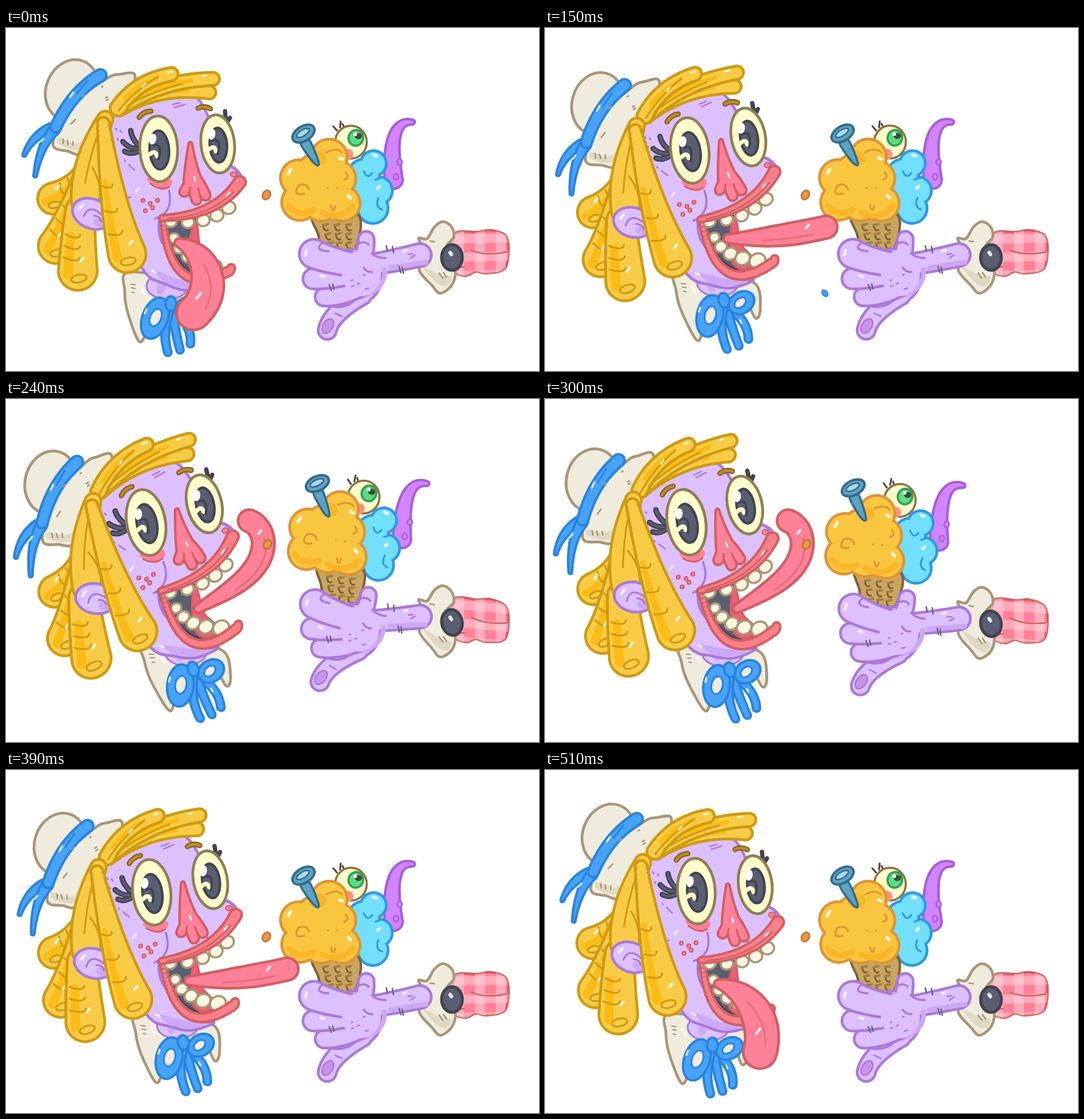
Animation, 876 px wide and 565 px high, one loop 0.54 s. Source, as an HTML page with a canvas:

```html
<!DOCTYPE html>
<html lang="en">
<head>
<meta charset="utf-8">
<title>Ice cream lick</title>
<style>
html, body { margin: 0; width: 100%; height: 100%; overflow: hidden; background: #fff; }
canvas { display: block; }
</style>
</head>
<body>
<canvas id="stage" width="876" height="565"></canvas>
<script>
const ctx = document.getElementById('stage').getContext('2d');
const LOOP = 540, STEP = 30;
const C = {
  cream: '#efecdd', creamDark: '#dfd9c4', creamLine: '#a89678',
  blue: '#47a3f7', blueLine: '#2a84dc', hair: '#f8cb47', hairDark: '#f9bb15', hairLine: '#cd9a12',
  skin: '#ddc0ff', skinDark: '#cda8f4', skinLine: '#aa79d8', lip: '#f97f88', red: '#d05f63',
  pink: '#ff8198', eye: '#fdfccb', eyeLine: '#8f7d55', ink: '#5a5e72', inkLine: '#41434f',
  ice: '#f9c640', iceDark: '#f9b628', iceLine: '#dc9436', mint: '#72dffd', mintLine: '#2f99df',
  violet: '#d384ff', violetLine: '#a65dd8', steel: '#5ea4c2', steelLine: '#326b8c',
  green: '#5bdc83', greenLine: '#319d52', cone: '#c9a561', coneLine: '#7e6234', tooth: '#faf7df'
};

const clamp = v => Math.max(0, Math.min(1, v));
const mix = (a, b, k) => a + (b - a) * k;
const times = (n, fn) => Array.from({ length: n }, (_, i) => fn(i));
const parse = s => s.split(' ').map(q => q.split(',').map(Number));
const bend = (q, k) => [0, 1].map(j => mix(mix(q[0][j], q[1][j], k), mix(q[1][j], q[2][j], k), k));

function paint(fill, line, width = 4.5) {
  if (fill) { ctx.fillStyle = fill; ctx.fill(); }
  if (line) { ctx.strokeStyle = line; ctx.lineWidth = width; ctx.stroke(); }
}
function oval(x, y, rx, ry, tilt, fill, line, width) {
  ctx.beginPath();
  ctx.ellipse(x, y, rx, ry, tilt, 0, 7);
  paint(fill, line, width);
}
// Smooth closed outline through a few points.
function blob(s, fill, line, width) {
  const p = parse(s), at = i => p[(i + p.length) % p.length];
  ctx.beginPath();
  ctx.moveTo(...p[0]);
  p.forEach((b, i) => {
    const a = at(i - 1), c = at(i + 1), d = at(i + 2);
    ctx.bezierCurveTo(b[0] + (c[0] - a[0]) / 6, b[1] + (c[1] - a[1]) / 6,
      c[0] - (d[0] - b[0]) / 6, c[1] - (d[1] - b[1]) / 6, ...c);
  });
  ctx.closePath();
  paint(fill, line, width);
}
// Strokes of one bend each, separated by bars.
function lines(s, color, width = 3) {
  ctx.beginPath();
  s.split('|').forEach(part => {
    const [a, b, c = b] = parse(part);
    ctx.moveTo(...a);
    ctx.quadraticCurveTo(...b, ...c);
  });
  paint(null, color, width);
}
const shine = (s, width = 4) => lines(s, 'rgba(255,255,255,.85)', width);

// A limb is a curved row of discs; tube() merges discs under one outline.
const limb = (s, r0, r1) => times(33, i => [...bend(parse(s), i / 32), mix(r0, r1, i / 32)]);
function discs(list, grow, color) {
  ctx.beginPath();
  list.forEach(([x, y, r]) => {
    const size = Math.max(.5, r + grow);
    ctx.moveTo(x + size, y);
    ctx.arc(x, y, size, 0, 7);
  });
  paint(color);
}
function tube(list, fill, line, width = 4.5) {
  discs(list, width / 2, line);
  discs(list, -width / 2, fill);
}
function specks(x, y, w, h, n, tilt, color) {
  let seed = x * 7 + y;
  const random = () => (seed = (seed * 16807 + 11) % 2147483647) / 2147483647;
  ctx.beginPath();
  for (let i = 0; i < n; i++) {
    const px = x + (random() - .5) * w, py = y + (random() - .5) * h, size = 2 + random() * 3;
    ctx.moveTo(px, py);
    ctx.lineTo(px + size * Math.cos(tilt), py + size * Math.sin(tilt));
  }
  paint(null, color, 2.5);
}
// Shear around (x0, y0).
function lean(p, a, y0, b, x0) {
  ctx.setTransform(1, b * p, a * p, 1, -a * p * y0, -b * p * x0);
}

function drawNeck() {
  blob('199,403 195,432 199,465 217,514 228,508 240,470 300,455 319,487 329,470 325,430 270,410', C.cream, C.creamLine);
  oval(265, 425, 34, 22, 0, C.skin, C.skinLine, 3);
  oval(255, 428, 7, 11, .3, C.skinDark);
  lines('206,428 212,429|207,435 211,436|205,422 212,423', C.creamLine, 2);
  shine('222,428 227,437');
}
function drawBow() {
  ['276,465 306,490 303,520', '273,465 278,500 286,530', '269,465 256,500 266,534']
    .forEach(s => tube(limb(s, 7, 6), C.blue, C.blueLine, 4));
  oval(245, 478, 21, 35, .35, C.blue, C.blueLine, 4);
  oval(246, 477, 9, 15, .4, C.cream, C.blueLine, 3);
  oval(299, 460, 23, 17, -.5, C.blue, C.blueLine, 4);
  oval(297, 460, 11, 7, -.6, C.cream, C.blueLine, 3);
  oval(271, 454, 9, 12, 0, C.blue, C.blueLine, 4);
  shine('228,470 231,463|293,488 295,493', 3);
}
function drawHat() {
  oval(108, 102, 42, 51, .4, C.cream, C.creamLine);
  blob('166,83 189,76 211,76 205,102 166,152 128,205 102,203 77,190 108,127', C.cream, C.creamLine);
  blob('88,180 85,189 104,199 125,200 136,185 112,190', C.creamDark);
  tube(limb('74,166 44,176 30,209', 9, 3), C.blue, C.blueLine, 4);
  tube(limb('80,167 56,192 48,243', 9, 3), C.blue, C.blueLine, 4);
  tube(limb('155,78 108,106 82,163', 10, 9), C.blue, C.blueLine, 4);
  specks(150, 110, 50, 30, 4, -.5, C.creamLine);
  lines('107,158 114,151|94,183 94,190|101,185 102,192|110,187 110,193', C.creamLine, 2.5);
  lines('133,88 116,108', C.blueLine);
  shine('105,114 111,106|62,182 57,187', 3);
}
function drawFace() {
  blob('163,170 185,138 240,114 295,109 316,117 334,150 352,210 383,238 384,256 352,290 262,313 252,318 258,355 305,415 333,424 295,432 260,421 228,402 190,330 165,220', C.skin, C.skinLine);
  blob('246,400 280,413 318,424 296,429 262,419', C.skinDark);
  lines('268,268 276,304 245,314|371,228 382,232 380,242', C.skinLine, 3.5);
  lines('202,225 208,232 211,234|197,285 200,278 205,279|274,126 286,123|277,131 294,126|329,278 335,285', C.skinLine, 2.5);
  specks(188, 190, 16, 60, 4, 1, C.skinLine);
  shine('214,269 219,264|240,399 246,403', 3);
  blob('232,248 268,248 272,258 256,267', C.pink);
  lines('237,256 252,269 268,262', C.red, 2.5);
  oval(374, 241, 5, 4, 0, C.pink, C.red, 2);
  times(5, i => oval(225 + i % 3 * 12 + (i > 2) * 4, 284 + (i > 2) * 12 + i % 2 * 5, 3, 3, 0, C.pink, C.red, 2));
}
function drawEye(x, y, k, tilt) {
  oval(x, y, 31 * k, 54 * k, tilt, C.eye, C.eyeLine);
  oval(x + 1, y + 2, 16 * k, 32 * k, -.06, C.ink, C.inkLine, 4);
  lines(`${x - 15},${y + 9} ${x - 5},${y + 1} ${x - 3},${y + 12}`, C.eye, 7);
  lines(`${x - 9},${y - 6} ${x + 7},${y - 10} ${x},${y + 17}`, C.inkLine, 4);
  oval(x - 10, y - 16, 6, 9, .2, '#fff');
}
function drawEyes() {
  const lashes = '216,192 206,180 205,169|214,199 200,197 192,187|216,204 204,209 195,203';
  lines(lashes, C.inkLine, 9);
  lines(lashes, C.ink, 4);
  lines('361,150 360,137|363,156 368,148', C.inkLine, 7);
  drawEye(251, 199, 1, -.04);
  drawEye(348, 191, .89, -.1);
  const brows = '219,147 226,137 238,137|316,132 326,127 336,133';
  lines(brows, '#8a681c', 9);
  lines(brows, '#bd8d2b', 4);
}
function drawNose() {
  const lobes = ['305,250 298,262 293,270', '307,250 309,270 313,283', '312,248 322,262 328,276'];
  tube([...limb('303,191 303,225 307,252', 3, 15), ...lobes.flatMap(s => limb(s, 9, 8))], C.pink, C.red, 4);
  lines('303,262 300,276|316,264 320,280', C.red);
  shine('309,245 311,252', 3);
}
function drawTeeth(s, size, growth) {
  times(5, i => {
    const [x, y] = bend(parse(s), i / 4), r = size + growth * i;
    oval(x, y, r * 1.1, r, -.2, C.tooth, C.creamLine, 3.5);
  });
}
function drawMouth() {
  blob('254,318 285,313 313,317 310,345 319,366 337,393 320,407 292,393 270,360', C.ink, C.inkLine, 3);
  blob('313,317 302,346 300,388 318,405 338,393 320,366', '#ee5f72', C.red, 3);
  drawTeeth('276,346 290,382 342,394', 8, 1);
  tube([...limb('259,322 272,448 363,402', 5, 8), ...limb('363,402 370,400 370,395', 8, 6)], C.lip, C.red, 4);
  drawTeeth('271,319 330,326 366,296', 9, .3);
  tube(limb('257,313 345,310 384,254', 5, 10), C.lip, C.red, 4);
  lines('266,314 335,310 374,270', C.red, 2.5);
  shine('363,276 368,271', 3);
}
function drawFringe() {
  ['186,132 252,94 334,106', '188,130 255,86 340,84', '184,132 215,86 272,76'].forEach(s => {
    tube(limb(s, 13, 11), C.hair, C.hairLine);
    discs(limb(s, 5, 3).slice(6, 26), 0, C.hairDark);
  });
  lines('185,136 212,103 250,80|200,128 240,104 290,92', C.hairLine, 3);
  shine('266,73 273,72|322,79 329,78|224,97 229,92', 3);
}
function drawBraid(s, r0, r1) {
  const rows = limb(s, r0, r1), [ex, ey] = rows[32];
  tube(rows, C.hair, C.hairLine);
  discs(rows.slice(12).map(([x, y, r]) => [x - r * .5, y + r * .2, r * .25]), 0, C.hairDark);
  for (let i = 13; i < 30; i += 6) {
    const [x, y, r] = rows[i], [nx, ny] = rows[i + 1], turn = Math.atan2(ny - y, nx - x);
    const side = k => `${x - Math.sin(turn) * r * k},${y + Math.cos(turn) * r * k}`;
    lines(`${side(.8)} ${x + Math.cos(turn) * 10},${y + Math.sin(turn) * 10} ${side(-.1)}`, C.hairLine);
  }
  oval(ex + 2, ey + r1 * .4, r1 * .4, r1 * .2, -.2, null, C.hairLine, 3);
  shine(`${ex + 4},${ey - 16} ${ex + 9},${ey - 21}`);
}
function drawHair() {
  drawBraid('142,205 128,262 78,281', 13, 26);
  drawBraid('130,235 102,322 82,359', 15, 29);
  drawBraid('122,300 118,350 118,400', 24, 32);
  tube(limb('163,150 128,220 138,282', 13, 31), C.hair, C.hairLine);
  lines('160,155 142,190 130,255|142,230 160,260 152,290', C.hairLine);
  oval(141, 306, 33, 24, .4, C.skin, C.skinLine);
  oval(154, 321, 11, 7, .3, C.skinDark);
  lines('128,310 138,285 164,315|145,309 156,311 156,319', C.skinLine);
  shine('121,297 127,291');
  drawBraid('160,157 174,292 199,372', 10, 31);
}

const rise = t => 1 - Math.abs(t - LOOP / 2) / (LOOP / 2);
const lickAt = t => Math.sin(clamp((rise(t) - .56) / .35) * Math.PI / 2);

// The tongue swings out first, then curls up.
function tongueSpine(t) {
  const swing = clamp(rise(t) / .56), lick = lickAt(t);
  const tilt = .3 * (1 - swing) ** 2 - .53 * lick, arc = 2.1 - 2.35 * swing + .25 * lick;
  const step = (143 + 20 * swing + 42 * lick) / 60, full = 28 - 9.5 * swing ** 2;
  let x = 282 + 16 * swing ** 2 + 15 * lick, y = 353 - 6 * swing;
  return times(61, i => {
    const s = i / 60, turn = tilt + arc * s - 2.2 * lick * s ** 3;
    const r = 7 + (full - 7) * Math.sin(clamp(s * 1.3) * Math.PI / 2);
    x += Math.cos(turn) * step;
    y += Math.sin(turn) * step;
    return [x, y, r];
  });
}
function drawTongue(t) {
  const spine = tongueSpine(t), [x, y, r] = spine[50];
  tube(spine, C.pink, C.red);
  ctx.beginPath();
  spine.slice(20, 52).forEach(([px, py, pr]) => ctx.lineTo(px + pr * .2, py + pr * .35));
  paint(null, '#e46d7b', 3);
  shine(`${x - r * .35},${y - r * .2} ${x - r * .1},${y - r * .5}`);
  drawDrops(t, spine[46]);
}
function drawDrops(t, [x, y]) {
  const lick = lickAt(t);
  oval(mix(428, x + 7, lick), mix(275, y, lick), 6, 8, .5, '#e99a45', '#c77834', 3);
  if (t >= 60 && t < 180) {
    const k = (t - 60) / 90;
    oval(427 + 33 * k, 285 + 152 * k, 2 + 2 * k, 2 + 4 * k, -.7, C.blue, C.blueLine, 2);
  }
}

function drawSleeve() {
  ctx.save();
  blob('738,338 775,336 796,333 820,341 826,362 820,396 790,404 772,401 756,408 736,401 724,372', C.pink, C.red, 4);
  ctx.clip();
  times(3, i => {
    lines(`${745 + i * 34},334 ${745 + i * 34},408`, 'rgba(255,220,226,.45)', 16);
    lines(`725,${348 + i * 30} 826,${346 + i * 30}`, 'rgba(255,220,226,.45)', 15);
  });
  ctx.restore();
  lines('765,366 785,376 823,369|741,395 753,393', C.red, 2.5);
  blob('678,347 692,347 704,328 718,319 732,327 736,344 724,360 722,388 738,400 733,423 714,437 700,424 679,398 690,371', C.cream, C.creamLine);
  blob('686,394 708,420 725,425 732,410 714,407', C.creamDark);
  lines('712,404 718,412|719,403 724,410|697,351 704,352', C.creamLine, 2.5);
  oval(733, 378, 17, 21, 0, C.ink, C.inkLine, 5);
  shine('730,370 732,373', 6);
}
function drawToppings() {
  tube(limb('637,250 626,150 668,155', 15, 4), C.violet, C.violetLine, 4);
  times(2, i => oval(647 - i * 6, 221 + i * 24, 4, 5, 0, C.violet, C.violetLine, 2.5));
  lines('549,164 550,154|544,169 538,162|555,162 553,158', '#5a4634');
  oval(567, 188, 26, 27, 0, C.eye, '#8a7344', 3.5);
  oval(562, 208, 9, 9, 0, '#ff9086');
  oval(575, 181, 12, 13, .2, C.green, C.greenLine, 3.5);
  oval(579, 178, 6, 5, 0, '#3c4b38');
  oval(574, 175, 3, 3, 0, '#fff');
}
function drawCone() {
  blob('506,306 513,340 523,370 548,373 572,368 579,308', C.cone, C.coneLine, 4);
  times(9, i => {
    const row = Math.floor(i / 3), x = mix(521, 529, row / 2) + i % 3 * (19 - row * 2), y = 325 + row * 15;
    lines(`${x},${y} ${x + 2},${y + 11} ${x + 8},${y + 8}`, C.coneLine);
    lines(`${x},${y} ${x + 8},${y - 2}`, '#a17f43', 4);
  });
}
function drawScoops() {
  tube(parse('604,223,21 612,268,23 603,297,25 588,242,26 582,280,25'), C.mint, C.mintLine);
  lines('588,236 594,250 602,239|612,280 606,295 618,299|615,247 607,250', C.mintLine);
  shine('604,209 609,211|611,264 614,261', 5);
  drawCone();
  tube(parse('531,213,30 481,247,30 546,248,29 483,287,30 553,289,29 518,286,32 514,248,42'), C.ice, C.iceLine);
  lines('465,294 480,312 505,300|520,304 550,318 570,294', C.iceDark, 10);
  oval(512, 215, 15, 12, 0, C.iceDark);
  lines('490,273 471,278 480,260|480,260 494,254 498,266|534,292 538,308 541,293|558,238 566,246 556,250|526,205 544,196 552,205', C.iceLine);
  times(2, i => oval(529 + i * 15, 264, 1.5, 1.5, 0, C.iceLine));
  shine('464,240 468,233|548,214 553,216|562,276 566,280', 5);
  blob('484,190 498,184 514,222 506,222', C.steel, C.steelLine, 3.5);
  oval(489, 174, 20, 12, -.55, C.steel, C.steelLine, 4);
  oval(488, 173, 12, 5, -.55, '#a9d9e8', C.steelLine, 2.5);
}
function drawHand() {
  const palm = times(29, i => [572 + 10 * Math.cos(i), 410 + 10 * Math.sin(i), 36]);
  tube([...palm, ...limb('600,390 640,383 680,374', 17, 19),
    ...limb('592,348 592,365 585,385', 13, 15), ...limb('528,498 534,470 585,440', 15, 16)], C.skin, C.skinLine);
  discs(limb('585,444 625,430 622,398', 3, 4), 0, C.skinDark);
  lines('632,395 655,391 690,386', C.skinDark, 8);
  [['523,443 550,442 580,424', 15], ['505,413 540,412 578,400', 17], ['506,372 535,385 585,392', 24]].forEach(([s, r]) => {
    tube(limb(s, r, 19), C.skin, C.skinLine);
  });
  oval(584, 404, 32, 38, 0, C.skin);
  lines('520,354 505,366 530,368|574,359 588,348 596,357|601,371 609,379 624,379|588,395 594,403 602,402|538,459 560,462 574,448', C.skinLine, 3.5);
  oval(529, 491, 8, 13, .55, '#c795e8', C.skinLine, 2.5);
  lines('541,470 552,475|661,373 668,372|665,379 672,374', C.skinLine, 2.5);
  specks(582, 410, 30, 50, 5, -.3, C.skinLine);
  lines('625,359 627,367|635,360 637,370|646,393 649,403|651,394 653,404|531,423 535,432|537,422 539,430', '#6c6680', 2.5);
  shine('492,375 494,366|517,408 523,410|653,368 658,366');
}
function drawArm(t) {
  const px = 826, py = 370;
  const lift = .115 * Math.cos(Math.min(1, Math.abs(t - 260) / 115) * Math.PI / 2) ** 2;
  ctx.setTransform(1, lift, 0, 1, 0, -lift * px);
  drawSleeve();
  ctx.setTransform(1, 0, 0, 1, px, py);
  ctx.rotate(lift);
  ctx.translate(-px, -py);
  drawToppings();
  drawScoops();
  drawHand();
}

function draw(t) {
  const p = Math.min(1, t / 240, (LOOP - t) / 270);
  ctx.setTransform(1, 0, 0, 1, 0, 0);
  ctx.fillStyle = '#fff';
  ctx.fillRect(0, 0, 876, 565);
  ctx.lineCap = ctx.lineJoin = 'round';
  drawArm(t);
  lean(p, .2, 270, -.11, 190);
  drawNeck();
  drawBow();
  lean(p, .19, 281, -.2, 285);
  drawHat();
  lean(p, .165, 325, -.235, 270);
  drawFace();
  drawEyes();
  drawNose();
  drawMouth();
  drawFringe();
  lean(p, .17, 268, -.2, 255);
  drawHair();
  ctx.setTransform(1, 0, 0, 1, 0, 0);
  drawTongue(t);
}
function tick() {
  draw(Math.floor(performance.now() % LOOP / STEP) * STEP);
  requestAnimationFrame(tick);
}
tick();
</script>
</body>
</html>
```
